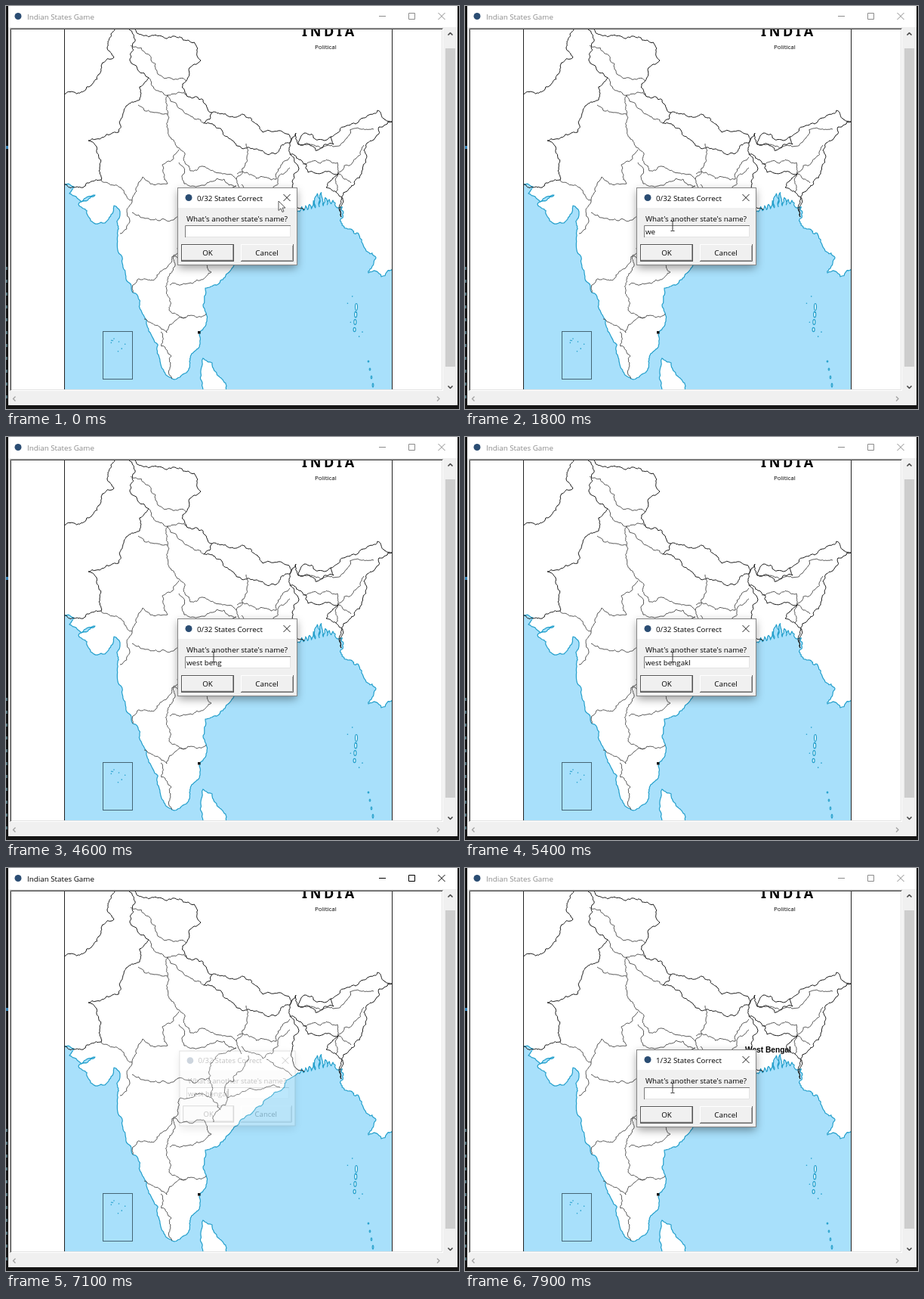
An HTML page for the animation above (8000 ms loop, 600 px wide and 533 px high).

```html
<!DOCTYPE html>
<html lang="en">
<head>
<meta charset="utf-8">
<title>Indian States Game</title>
<style>
html, body { margin: 0; width: 100%; height: 100%; overflow: hidden; background: #161616; }
svg { display: block; width: 600px; height: 533px; }
text { font: 9.8px "Open Sans", "Noto Sans", sans-serif; white-space: pre; }
.mid { text-anchor: middle; }
.line { fill: none; stroke-linejoin: round; }
.glyph { fill: none; stroke: currentColor; }
.shore { stroke: #239fcb; stroke-width: 1.2; }
#caption, #label, #beam { animation: 8s step-end infinite; }
#caption { color: #8c8c8c; animation-name: focus; }
#label { animation-name: label; }
#beam { animation-name: beam; }
#arrow { animation: glide 8s linear infinite; }
#dialog { transform-origin: 306px 291px; animation: fade 8s linear infinite; }
@keyframes focus { 0%, 90.6% { color: #8c8c8c; } 87.6% { color: #000; } }
@keyframes fade {
  0%, 87.5% { opacity: 1; transform: none; }
  88.75% { opacity: .24; transform: scale(.97); }
  89.5%, 90% { opacity: 0; transform: scale(.96); }
  91.25% { opacity: .64; transform: scale(.985); }
  92.3%, 100% { opacity: 1; transform: none; }
}
@keyframes label { 0% { opacity: 0; } 89.9% { opacity: 1; } }
@keyframes glide {
  0%, 1% { transform: translate(361px, 258px); opacity: 1; }
  6.8% { transform: translate(275px, 284px); opacity: 1; }
  6.81%, 100% { transform: translate(275px, 284px); opacity: 0; }
}
@keyframes beam { 0% { opacity: 0; } 6.81% { opacity: 1; } 87.6% { opacity: 0; } 90.6% { opacity: 1; } }
</style>
</head>
<body>
<svg viewBox="0 0 600 533">
  <defs>
    <clipPath id="view"><rect x="7" y="31" width="570" height="476"/></clipPath>
    <clipPath id="sheet"><rect x="77" y="31" width="434" height="476"/></clipPath>
  </defs>
  <rect width="600" height="533" fill="#161616"/>
  <g id="specks"></g>
  <rect x="3" width="595" height="528" fill="#f0f0f0"/>
  <rect x="3" width="595" height="28" fill="#fff"/>
  <g id="caption">
    <text x="28" y="17.5" fill="currentColor">Indian States Game</text>
    <path class="glyph" d="M494 13.5h9M533.5 9.5h8v8h-8zM572.5 9l9 9m0-9l-9 9"/>
  </g>
  <circle cx="16" cy="13.5" r="4.5" fill="#2b4d73"/>

  <rect x="5" y="29" width="574" height="480" fill="#fff"/>
  <path class="line" d="M5.5 509V29.5H579" stroke="#a0a0a0"/>
  <path class="line" d="M6.5 508V30.5H578" stroke="#4a4a4a"/>
  <path class="line" d="M577.5 31V507.5H7" stroke="#e3e3e3"/>
  <g clip-path="url(#view)">
    <g clip-path="url(#sheet)" id="map"></g>
    <path class="line" d="M77.5 31V507M511.5 31V507" stroke="#222"/>
    <text x="392" y="40" style="font:bold 18px 'Noto Sans',sans-serif;letter-spacing:3.7px">INDIA</text>
    <text x="409" y="57" style="font-size:8px">Political</text>
    <g id="label">
      <circle cx="373" cy="247" r="1.8" fill="#444"/>
      <text x="371" y="243.5" style="font:bold 10.2px 'Liberation Sans',Arial,sans-serif">West Bengal</text>
    </g>
  </g>

  <rect x="582" y="56" width="13" height="421" fill="#cdcdcd"/>
  <path class="line" d="M585.5 38.5l3-3 3 3M585.5 502.5l3 3 3-3" stroke="#444" stroke-width="1.6"/>
  <path class="line" d="M12.5 516.5l-3 3 3 3M571 516.5l3 3-3 3" stroke="#a3a3a3" stroke-width="1.4"/>

  <g id="dialog">
    <rect x="228" y="240.5" width="157" height="102" fill="#f0f0f0" style="filter:drop-shadow(0 4px 6px rgba(0,0,0,.4))"/>
    <rect x="228" y="241" width="157" height="26" fill="#fff"/>
    <rect x="227.5" y="240.5" width="158" height="102" fill="none" stroke="#858585"/>
    <circle cx="242" cy="253.5" r="4.5" fill="#2b4d73"/>
    <text id="score" x="253" y="257.5"></text>
    <path class="glyph" d="M367.5 249l9 9m0-9l-9 9" stroke-width=".9"/>
    <text x="239" y="284.5">What's another state's name?</text>
    <rect x="237" y="290" width="140" height="16" fill="#fff"/>
    <path class="line" d="M237.5 306V290.5H377" stroke="#7a7a7a"/>
    <path class="line" d="M376.5 291V305.5H238" stroke="#e3e3e3"/>
    <text id="entry" x="239" y="302"></text>
    <rect id="caret" y="292" width="1.5" height="12"/>
    <path class="line" d="M233.5 336V316.5H301" stroke="#fff"/>
    <path class="line" d="M301 316V336.5H233" stroke="#777" stroke-width="1.5"/>
    <rect x="232.5" y="315.5" width="69" height="22" fill="none" stroke="#555"/>
    <text class="mid" x="267" y="330">OK</text>
    <path class="line" d="M311.5 337V315.5H380" stroke="#fff"/>
    <path class="line" d="M380.5 315V337.5H311" stroke="#666"/>
    <path class="line" d="M379.5 317V336.5H312" stroke="#aaa"/>
    <text class="mid" x="345.5" y="330">Cancel</text>
  </g>
  <path id="arrow" d="M0 0V12.5l3-2.7 2 4.7 2-1-2-4.5h4z" fill="#fff" stroke="#444" stroke-width=".9"/>
  <path id="beam" class="line" d="M272.5 284.5h2l.5.5.5-.5h2M275 285v12M272.5 297.5h2l.5-.5.5.5h2" stroke="#333"/>
</svg>
<script>
const $ = id => document.getElementById(id);
const LOOP = 8000, RESET = 7180;

let seed = 11;
const rand = () => (seed = (seed * 16807) % 2147483647) / 2147483647 - 0.5;
const near = (mid, spread) => mid + rand() * spread;

function add(parent, tag, attrs) {
  const el = document.createElementNS("http://www.w3.org/2000/svg", tag);
  for (const k in attrs) el.setAttribute(k, attrs[k]);
  $(parent).appendChild(el);
}

// Midpoint displacement: splits a stretch until its steps are short.
function split([ax, ay], [bx, by], bend) {
  const dx = bx - ax, dy = by - ay;
  if (Math.hypot(dx, dy) < 3) return [[bx, by]];
  const off = rand() * bend;
  const mid = [(ax + bx) / 2 - dy * off, (ay + by) / 2 + dx * off];
  return [...split([ax, ay], mid, bend), ...split(mid, [bx, by], bend)];
}

function rough(text, bend) {
  const pts = text.trim().split(/\s+/).map(p => p.split(",").map(Number));
  const steps = pts.slice(1).flatMap((p, i) => split(pts[i], p, bend));
  return [pts[0], ...steps].map(p => p.map(v => v.toFixed(1)).join()).join(" ");
}

const west = `77,236 90,239 84,248 100,259 118,250 96,262 112,284 131,287 142,272 143,264 151,272
  148,298 154,340 168,379 189,430 204,470 220,493 239,485`;
const east = `239,485 243,470 257,447 257,431 266,417 261,395 264,373 290,359 301,345 325,325 349,303
  371,281 387,271`;
const arakan = "433,257 444,281 471,312 484,347 480,353 497,358 512,346";

// River mouths: a saw edge with deeper inlets in the middle.
let delta = "";
for (let x = 389, i = 0; x < 433; x += 2.6, i++) {
  const inlet = i % 2 ? 6 + 14 * Math.exp(-(((x - 415) / 7) ** 2)) : 0;
  delta += ` ${x},${272 - (x - 389) / 4 - inlet}`;
}
const coast = [rough(west, 0.3), rough(east, 0.3), rough(delta, 0.3), rough(arakan, 0.6)].join(" ");
add("map", "polygon", { points: coast + " 512,508 77,508", fill: "#a8e0fb" });
add("map", "polyline", { points: coast, class: "line shore" });
add("map", "polygon", {
  points: rough("261,466 273,472 288,496 292,510 262,510 258,486 261,466", 0.3),
  fill: "#fff", class: "shore"
});

const abroad = [
  "144,31 134,55 143,68 122,91 107,107 77,117",
  "163,31 171,44 164,72 189,95 177,124 149,167 109,178 124,214 126,230 77,236",
  "171,31 195,39 241,45 258,72 234,103 241,120 273,141",
  "273,141 300,146 340,167 376,172 376,196",
  "273,141 262,155 300,178 358,195 376,181",
  "376,181 384,168 387,183 434,183 430,173 395,168 387,183",
  "430,173 463,156 492,138 511,153 487,177",
  "487,177 474,191 471,222 456,240 444,279 437,246 424,240 440,222",
  "440,222 400,220 388,203 376,196 388,215 379,232 395,270"
];
const north = [
  "165,52 190,65 201,90 239,99",
  "189,95 214,118 241,120",
  "175,131 214,143 214,118 226,130 262,155",
  "214,143 219,176 237,195 244,218 305,229",
  "229,190 207,210 214,235 181,226 167,257",
  "229,207 236,235 305,238",
  "126,230 152,240 167,257 164,285 151,301",
  "318,182 319,200 305,229 312,246",
  "306,222 358,229 376,200",
  "312,236 340,252 376,214",
  "387,183 434,186 487,163",
  "393,209 439,207 440,222 474,184",
  "437,246 440,222 457,234"
];
const south = [
  "167,273 203,284 228,278 270,278",
  "345,253 379,275",
  "305,238 270,265 272,304 284,320",
  "321,248 290,289 293,304 275,336",
  "293,304 334,293 363,290",
  "271,304 231,304 214,345 174,362 168,379",
  "222,331 213,377 216,402 238,412 265,407",
  "217,369 272,352 258,333 222,331",
  "238,412 217,421 213,432 183,414",
  "205,431 219,463 220,493"
];
const border = (lines, stroke, width) => lines.forEach(s =>
  add("map", "polyline", { points: rough(s, 0.42), class: "line", stroke, "stroke-width": width }));
border([...north, ...south], "#444", 0.9);
border(abroad, "#181818", 1);
add("map", "rect", { x: 254, y: 430, width: 3.5, height: 3.5, fill: "#111" });

function isle(cx, cy, rx, ry) {
  add("map", "ellipse", { cx, cy, rx, ry, fill: "#e8f8ff", class: "shore" });
}
for (let i = 0; i < 4; i++) {
  isle(464 - i * 0.8, 398 + i * 10, 1.5, 4.5 - i * 0.6);
  isle(480 + i * 2, 470 + i * 10.5, 0.8, 1 + i * 0.5);
}
function scatter(n, x, y, w, h) {
  while (n--) add("map", "circle", { cx: near(x, w), cy: near(y, h), r: 0.8, fill: "#239fcb" });
}
scatter(8, 148, 448, 24, 28);
scatter(6, 465, 410, 30, 70);
add("map", "rect", { x: 128.5, y: 430.5, width: 39, height: 63, fill: "none", stroke: "#456574" });

for (let y = 345; y < 520; y += 17) add("specks", "rect", { x: 0, y, width: 2, height: 4, fill: "#53727a" });
add("specks", "rect", { x: 0, y: 185, width: 3, height: 4, fill: "#3a86b8" });

// Time of each key press; "<" is backspace
const keys = [
  [1100, "w"], [1500, "e"], [2000, "s"], [2400, "t"], [2800, " "], [3300, "b"], [3500, "e"], [3900, "n"],
  [4600, "g"], [4800, "a"], [5000, "k"], [5200, "l"], [5700, "<"], [5900, "<"], [6200, "l"]
];
const typed = t => t >= RESET ? "" : keys.reduce(
  (s, [at, k]) => at > t ? s : k === "<" ? s.slice(0, -1) : s + k, "");

function draw(t) {
  const word = typed(t);
  $("entry").textContent = word;
  $("score").textContent = `${t < RESET ? 0 : 1}/32 States Correct`;
  $("caret").setAttribute("x", 238.5 + (word ? $("entry").getComputedTextLength() : 0));
  $("caret").style.opacity = (t < RESET ? t % 900 >= 300 : t < 7800) ? 1 : 0;
}

let start = null;
function tick(now) {
  start ??= now;
  draw((now - start) % LOOP);
  requestAnimationFrame(tick);
}
draw(0);
requestAnimationFrame(tick);
</script>
</body>
</html>
```
